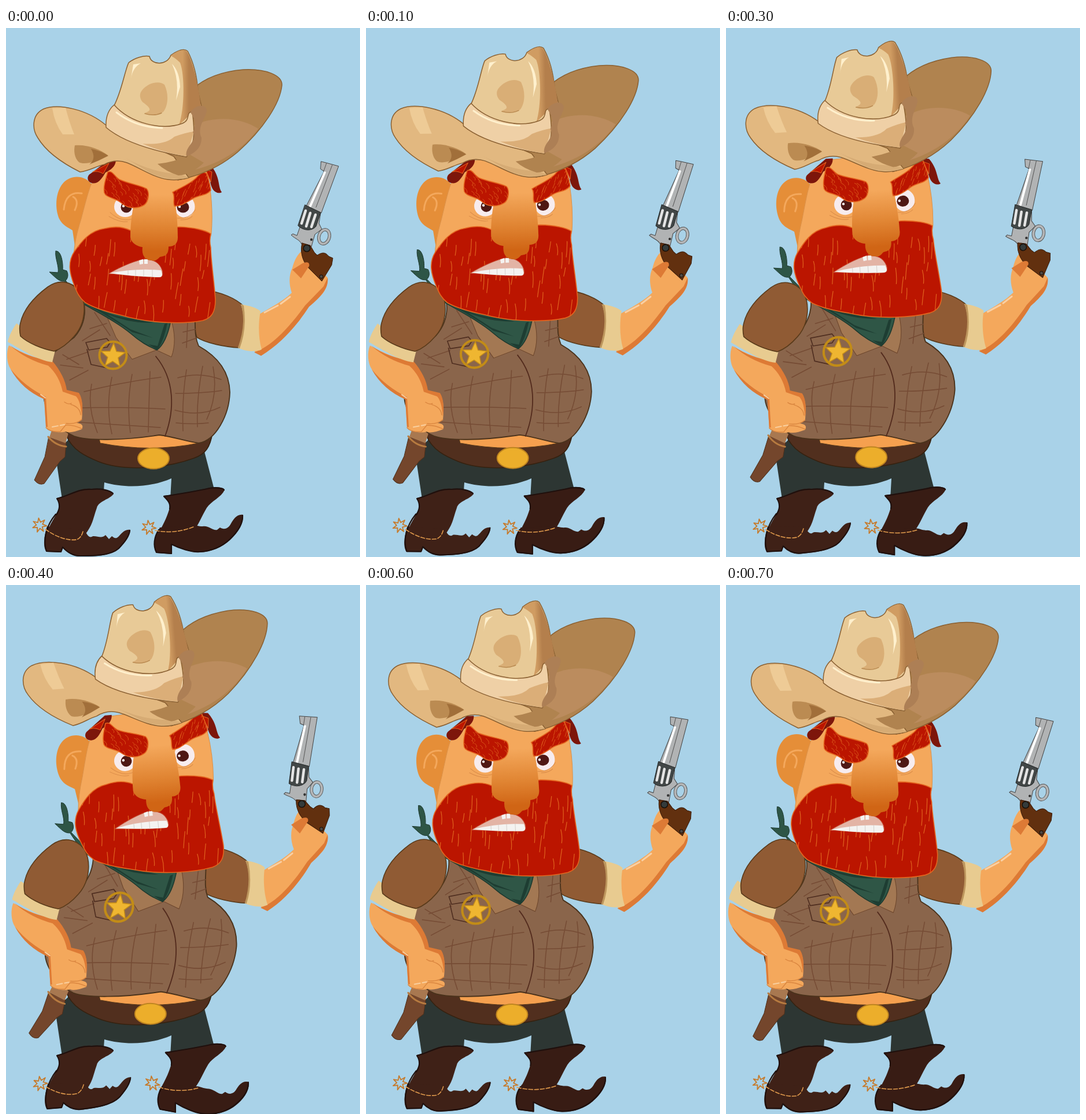
Write an HTML page that moves like this. It is 612 by 915 pixels and loops after 800 ms.

```html
<!DOCTYPE html>
<html lang="en">
<head>
<meta charset="utf-8">
<title>Angry sheriff</title>
<style>
html, body { margin: 0; width: 100%; height: 100%; overflow: hidden; background: #a9d2e8; }
svg { display: block; width: 100vw; height: 100vh; }
path { stroke-linejoin: round; stroke-linecap: round; }
.line { fill: none; }
.skin { fill: #f4a85c; }
.shade { fill: #dd7a35; }
.sleeve { fill: #905b34; stroke: #593a1a; stroke-width: 1.6; }
.cuff { fill: #e8cb90; }
.boot { fill: #3f2117; }
.boot.far { fill: #381c14; }
.edge { fill: none; stroke: #1f100d; stroke-width: 2.2; }
.chain { fill: none; stroke: #e09a4c; stroke-width: 1.6; stroke-dasharray: 7 3; }
.spur { fill: none; stroke: #c67a2b; stroke-width: 1.8; }
.plaid { fill: none; stroke: #754b34; stroke-width: 1.5; }
.hair { fill: #bb1500; stroke: #e4641f; stroke-width: 1.6; }
.strand { fill: none; stroke: #e0631f; stroke-width: 1.2; }
.strand.fine { stroke-width: .8; }
.gun { fill: #b1b3b4; stroke: #444; stroke-width: 1; }
.hat { stroke: #8a6032; stroke-width: 1.5; }
</style>
</head>
<body>
<svg viewBox="0 0 612 915" preserveAspectRatio="none">
<defs>
  <linearGradient id="noseFill" gradientUnits="userSpaceOnUse" x1="0" y1="288" x2="0" y2="386">
    <stop offset="0" stop-color="#f4a85c"/><stop offset=".55" stop-color="#e18634"/><stop offset="1" stop-color="#d06515"/>
  </linearGradient>
  <linearGradient id="sideFill" gradientUnits="userSpaceOnUse" x1="292" y1="0" x2="336" y2="0">
    <stop offset=".3" stop-color="#d09c62"/><stop offset=".55" stop-color="#b47f4c"/>
  </linearGradient>
  <clipPath id="beardClip"><use href="#beard"/></clipPath>
  <clipPath id="browClipL"><use href="#browL"/></clipPath>
  <clipPath id="browClipR"><use href="#browR"/></clipPath>
</defs>

<path fill="#2d3633" d="M85 735L97 815 168 815 170 786C205 796 250 795 286 779L284 815 361 802 341 725 108 712Z"/>

<g>
  <path class="boot" d="M88 813C110 808 125 795 148 797 165 796 180 799 186 806 180 815 160 818 157 830 150 850 150 860 136 877L120 895 70 887C67 870 82 852 87 840 95 830 92 822 88 813Z"/>
  <path class="edge" d="M87 842C95 830 92 820 88 814 110 809 125 796 148 798 165 796 180 800 185 805"/>
</g>
<g id="footL">
  <path class="boot" d="M71 862C64 885 65 900 70 906L95 907 98 898C105 906 115 914 128 914 150 914 182 914 196 900 207 889 214 879 215 868 204 866 199 876 193 881 189 884 186 881 183 879L178 884 172 877C165 884 158 878 150 879 142 885 138 870 135 868Z"/>
  <path class="edge" d="M86 841C70 860 63 885 70 905L95 906 98 898C108 909 118 913 128 913 150 913 181 913 195 900 206 888 213 879 214 869"/>
  <path class="chain" d="M68 867Q98 888 122 885 130 882 133 871"/>
  <path class="spur" data-spur="58 860"/>
</g>
<g id="shaftR">
  <path class="boot far" d="M272 809C300 806 330 800 352 795 365 793 376 795 378 799 372 812 355 818 347 830 338 845 335 855 326 868L300 893 262 876C275 855 280 840 283 830 285 820 278 815 272 809Z"/>
  <path class="edge" d="M283 832C285 820 278 816 273 810 300 806 330 801 352 796 365 794 376 796 377 799"/>
</g>
<g id="footR">
  <path class="boot far" d="M266 864C256 880 254 895 260 908L287 910 287 893C300 900 320 908 335 907 355 906 374 898 387 886 400 874 411 858 410 842 399 840 393 850 389 857 384 867 376 868 370 864L365 868C358 870 350 860 340 862 332 862 328 860 324 860Z"/>
  <path class="edge" d="M264 868C256 880 254 895 260 907L286 909 286 893C300 900 320 907 335 906 355 905 373 897 386 885 399 873 410 858 409 843"/>
  <path class="chain" d="M258 869Q290 876 324 863"/>
  <path class="spur" data-spur="247 864"/>
</g>

<path fill="#512f1e" stroke="#35210f" stroke-width="1.6" d="M104 704L124 692 338 702 357 700C353 725 345 737 325 744 270 764 200 766 160 750 138 741 114 730 104 704Z"/>
<path fill="#f5a04f" stroke="#593a1a" d="M158 695L332 700 333 718Q250 735 163 718Z"/>
<ellipse id="buckle" cx="255" cy="744.500" rx="27" ry="18" fill="#ecae2b" stroke="#be8420" stroke-width="2"/>

<g id="holster">
  <path fill="#74462c" stroke="#50301b" d="M74 708L104 717 102 742 93 750 66 788Q57 792 49 782L67 742Z"/>
  <path fill="#a87850" d="M79 696L109 697 103 718 75 708Z"/>
  <path class="line" stroke="#b77b40" stroke-width="3" d="M73 707Q85 722 104 724"/>
</g>

<g id="armR">
  <path class="sleeve" d="M340 453C372 456 398 468 412 482 417 510 410 537 403 553 380 552 345 545 330 535L320 500Z"/>
  <path class="skin" d="M436 496C455 485 480 472 494 458 488 440 490 425 495 415 499 400 504 392 512 385L556 432C557 442 552 455 545 462L520 482C500 512 475 542 442 566L430 560Z"/>
  <path class="shade" d="M429 561L441 556C470 540 495 510 517 480L549 447 556 432C558 448 548 462 524 482 502 516 475 546 441 567Z"/>
  <path class="line" stroke="#f9d0a4" stroke-width="3" d="M447 492L470 480M475 477L491 465"/>
  <path class="cuff" d="M406 478C420 480 434 484 440 490 436 510 436 535 442 556 430 562 410 558 401 553 412 530 414 500 406 478Z"/>
  <path fill="#bd965d" d="M406 478L411 480Q417 520 404 554L401 553Q416 510 406 478Z"/>
</g>

<g id="gun">
  <path class="gun" d="M545 231L553 233 575 239 545 320 519 308 550 248 544 244Z"/>
  <path class="line" stroke="#fff" stroke-width="4" d="M551 250L526 308"/>
  <path class="line" stroke="#555" d="M564 237L536 310M554 234L549 248"/>
  <ellipse cx="550" cy="361" rx="9" ry="12.500" transform="rotate(17 550 361)" fill="none" stroke="#555" stroke-width="5.500"/>
  <ellipse cx="550" cy="361" rx="9" ry="12.500" transform="rotate(17 550 361)" fill="none" stroke="#b5b6b7" stroke-width="3.700"/>
  <path class="gun" d="M536 318L544 320 541 338 546 348 534 357 528 378 511 374C508 366 500 365 493 358L496 356 503 359 509 342Z"/>
  <path fill="#424747" stroke="#252929" d="M517 306L544 319 536 343C530 351 515 352 505 342Z"/>
  <path class="line" stroke="#e4e4e4" stroke-width="4.500" d="M518 316L511 338M526 320L519 343M535 323L528 344"/>
  <circle cx="528" cy="366" r="2.200" fill="#333"/>
  <path fill="#62300f" stroke="#3a1b09" d="M512 372L526 376 533 388 538 393C545 389 551 386 558 395L565 398 563 410 546 438 522 414C512 402 508 386 512 372Z"/>
  <circle cx="520" cy="381" r="5.800" fill="#343b3b" stroke="#17100a" stroke-width="1.500"/>
  <circle cx="545" cy="430" r="3" fill="#514943" stroke="#17100a"/>
</g>
<path class="shade" id="thumb" d="M495 418L511 408C518 404 526 404 524 412L510 433Z"/>

<g id="torso">
  <path fill="#8a654b" stroke="#4a321b" stroke-width="1.8" d="M128 455C140 480 140 510 118 535L79 564C75 585 70 620 66 642 68 665 95 697 118 706 140 714 200 714 265 704 290 707 315 716 333 718 362 714 386 670 387 630 386 590 360 565 333 550 325 532 328 515 326 490L250 460Z"/>
  <path class="line" stroke="#532b1d" stroke-width="1.8" d="M259 568C292 608 292 660 275 706"/>
  <path class="plaid" d="M135 629Q205 612 268 604M132 657Q200 655 275 659M127 682Q190 686 267 691M148 616Q140 655 158 700M183 604Q172 655 183 702M218 599Q208 650 215 700M249 594Q247 650 246 699M297 605Q335 594 372 608M293 632Q340 632 373 627M292 661Q335 673 370 656M294 683Q325 686 350 683M312 591Q304 640 306 697M340 585Q329 640 331 690M358 586Q367 635 347 677"/>
  <path class="plaid" d="M145 520L174 511M132 541L162 522M153 492L180 532M306 526L328 521M305 545L330 536M314 508L312 553M98 565L126 582M94 583L133 588M110 609L142 592M105 573L143 560"/>
  <path class="line" stroke="#4f2e20" stroke-width="1.600" d="M138 544L174 537 180 544 175 552 143 557ZM140 556L147 582 175 588"/>
  <path fill="#a37853" stroke="#6c452b" d="M174 498L190 535 218 573 260 557 286 569C293 550 293 528 285 503Z"/>
  <circle cx="185" cy="566" r="23.500" fill="none" stroke="#c28c17" stroke-width="4"/>
  <path id="star" fill="#efb631" stroke="#c58d19" stroke-width="1.500"/>
</g>

<g id="scarf">
  <path fill="#2e5546" stroke="#1d382e" d="M86 386C95 384 99 405 98 418L105 420C109 428 106 434 103 437L135 470 120 466 101 438C92 439 87 433 75 422L90 423C92 412 84 397 86 386Z"/>
  <path fill="#2f5646" stroke="#1d382e" stroke-width="1.5" d="M120 455L286 500C281 530 273 548 261 557 245 550 232 543 215 528 190 507 155 490 132 476Z"/>
  <path fill="#1e3d32" d="M137 473Q175 499 225 504L254 510Q213 511 175 495L215 521 254 536 218 526Q178 499 137 477ZM262 550L274 512 279 510Q274 538 262 557L246 547Z"/>
</g>

<g id="armL">
  <path class="skin" d="M5 549C0 560 1 580 8 590 20 612 45 632 66 642L69 690C75 699 95 701 103 698 110 701 120 698 131 694 135 687 130 684 122 683L131 678C133 660 133 645 126 632L104 627C102 612 93 593 80 577 45 570 25 560 5 549Z"/>
  <path class="shade" d="M7 549Q35 570 80 576C94 592 103 610 105 626L126 631C133 642 133 658 131 672Q129 645 121 637L98 629Q92 601 73 584 35 574 7 549ZM8 590Q32 620 69 638L72 690 69 690 66 642Q27 625 8 590Z"/>
  <path class="line" stroke="#d9853f" stroke-width="1.4" d="M69 691Q75 699 94 698L103 687Q116 686 131 693M104 684Q121 686 131 677M101 647Q108 652 113 649M112 651Q128 656 129 669"/>
  <path class="line" stroke="#f9cf9f" stroke-width="2" stroke-dasharray="10 4" d="M60 634L70 641M80 690L101 686"/>
  <path class="cuff" d="M18 511C12 520 5 532 3 543 25 555 55 575 80 578L85 558 24 515Z"/>
  <path class="sleeve" d="M24 515C28 490 45 468 72 448 90 435 112 436 128 456 140 478 137 512 118 533 105 548 92 556 83 559 62 555 38 545 25 533Q23 523 24 515Z"/>
</g>

<g id="head">
  <path fill="#e58e38" d="M151 275C140 254 113 252 99 268 84 285 85 315 92 330 98 342 108 345 115 350L119 377 140 320Z"/>
  <path class="line" stroke="#f4a85c" stroke-width="3" d="M100 314C102 292 113 283 131 286M116 292Q127 298 119 315"/>
  <path class="skin" stroke="#db9149" d="M152 262C145 270 138 300 130 330 122 355 118 375 117 395L130 420 340 420 355 355C358 320 355 280 347 245L300 225 190 230Z"/>
  <path fill="#7d160b" d="M178 228L146 252C139 256 140 266 148 268 158 271 165 262 172 250 180 246 190 240 190 228ZM340 238C355 250 350 265 357 278 361 285 369 287 373 284 366 275 371 260 356 240Z"/>
  <path fill="#bb1500" stroke="#e4641f" d="M150 249L178 234 168 252Q158 246 150 249ZM345 244L356 249 354 266Z"/>
  <g fill="#f7ecee">
    <ellipse cx="206" cy="309" rx="19" ry="18"/><ellipse cx="309" cy="309" rx="17.500" ry="19"/>
  </g>
  <g fill="#4f1814"><circle cx="208" cy="310" r="9.500"/><ellipse cx="306" cy="310" rx="10.500" ry="9.500"/></g>
  <g fill="#fff"><circle cx="203" cy="308" r="2.200"/><circle cx="300" cy="309" r="2.200"/></g>
  <path class="line" stroke="#d98b48" d="M180 319Q200 338 222 329M178 326Q197 337 210 335M296 329Q317 331 327 315M302 332Q316 332 322 326"/>
  <path id="beard" class="hair" d="M118 387C130 370 145 350 170 347 190 342 205 345 215 350L300 344C325 345 345 350 354 356 352 365 352 372 354 380 354 400 360 440 362 470 362 492 355 502 340 506 310 512 250 512 200 497 170 490 150 483 137 475 125 465 122 455 118 445 110 425 106 405 118 387Z"/>
  <path id="beardHair" class="strand" clip-path="url(#beardClip)"/>
  <path fill="#e3b4a5" stroke="#c5442a" d="M177 425C195 415 215 405 237 400 255 400 265 405 270 419 272 427 270 431 265 431 240 431 210 427 177 425Z"/>
  <path fill="#f4f3f1" d="M180 424Q225 415 268 419L270 426Q270 431 265 431 220 430 180 424ZM230 402L237 400 237 408 231 409ZM239 400L245 400 245 408 239 408Z"/>
  <path class="line" stroke="#cfc8c3" stroke-width=".8" d="M211 419V427M224 418V429M238 418V430M253 418V430"/>
  <path fill="url(#noseFill)" d="M225 288C219 310 215 335 215 362 217 373 228 378 236 379 234 395 242 402 252 402 258 404 262 400 266 396 272 394 281 396 281 378 290 378 297 374 297 362 297 345 296 325 291 288Z"/>
  <g id="browGroupL">
    <path id="browL" class="hair" d="M176 249C185 246 187 257 196 262 211 269 232 272 243 278 249 285 246 301 239 306 228 313 212 313 201 304 191 294 173 294 170 285 168 274 172 262 176 249Z"/>
    <path id="browHairL" class="strand fine" clip-path="url(#browClipL)"/>
  </g>
  <g id="browGroupR">
    <path id="browR" class="hair" d="M288 284C300 277 318 270 328 260 335 252 342 247 347 252 350 262 353 270 354 281 345 291 335 288 323 295 311 302 301 309 291 308 288 300 293 292 288 284Z"/>
    <path id="browHairR" class="strand fine" clip-path="url(#browClipR)"/>
  </g>
</g>

<g id="hat">
  <path class="hat" fill="#b0834f" d="M322 106C345 85 375 75 410 72 450 70 478 82 477 99 474 130 445 175 400 215 370 240 335 256 297 263L250 230Z"/>
  <path fill="#bb8c5e" d="M325 168C365 150 408 156 436 174 412 207 368 241 300 250Z"/>
  <path class="hat" fill="#e2b880" d="M174 169C140 140 90 130 65 140 44 150 45 175 55 190 70 215 100 235 128 249 145 247 155 239 170 236Q189 226 209 233C230 241 255 259 280 262 293 264 305 262 316 259L290 222Z"/>
  <path fill="#d6ab74" d="M205 224Q250 250 302 253L316 259Q282 266 250 251Z"/>
  <path fill="#b0834f" d="M262 235Q292 232 318 219L342 233Q320 254 298 255 276 248 262 235Z"/>
  <path fill="#bb8b52" d="M119 203C140 201 163 210 176 220 160 230 136 238 126 232 118 225 117 212 119 203Z"/>
  <path fill="#a16f3a" d="M147 209Q163 212 177 221 160 230 144 236 157 226 147 209Z"/>
  <path fill="#eecb96" d="M80 139L103 138Q110 165 118 184L98 184Q84 165 80 139Z"/>
  <path class="hat" fill="#e8ca97" d="M186 136C200 110 205 75 212 60 222 52 238 47 248 49 251 65 279 65 285 47 295 40 307 34 314 40 322 55 330 80 332 110L339 140 310 172C270 178 215 165 186 136Z"/>
  <path fill="url(#sideFill)" d="M285 48C295 40 307 35 313 41 324 60 333 100 337 136L318 150 299 168C309 140 309 80 301 60Q293 52 285 48Z"/>
  <path fill="#d9ae76" d="M235 108C245 95 265 90 274 98 282 115 280 135 272 145 262 152 245 151 240 147 253 143 250 138 236 128 230 120 231 113 235 108Z"/>
  <path class="line" stroke="#b98a51" stroke-width="1.500" d="M240 148Q256 153 269 147"/>
  <path fill="#fff0cd" d="M287 62Q300 75 301 102L294 125Q300 90 287 62ZM220 63L233 61Q219 68 216 88Z"/>
  <path class="hat" fill="#efd0a6" d="M187 133C176 142 172 155 173 172 200 195 250 212 312 223 326 205 327 180 322 145 310 145 320 159 305 165 270 178 215 165 187 133Z"/>
  <path fill="#dbae78" d="M236 200Q275 203 291 188 310 181 325 179L312 222Q270 215 236 200Z"/>
  <path fill="#ad7f55" d="M319 146C324 135 345 129 347 142 347 155 329 170 338 190 338 205 330 215 312 222 308 205 332 196 323 180Q332 165 319 146Z"/>
  <path class="line" stroke="#fff0cd" stroke-width="3" d="M191 146Q225 172 270 173"/>
</g>
</svg>
<script>
const el = id => document.getElementById(id);

// Small seeded generator keeps the hair identical on every load.
function seeded(s) {
  return () => (s = (s * 16807) % 2147483647) / 2147483647;
}

function starPath(cx, cy, tips, outer, inner, turn) {
  let d = "";
  for (let i = 0; i < tips * 2; i++) {
    const r = i % 2 ? inner : outer, a = turn + Math.PI * i / tips;
    d += (i ? "L" : "M") + (cx + r * Math.cos(a)).toFixed(1) + " " + (cy + r * Math.sin(a)).toFixed(1);
  }
  return d + "Z";
}

// Jittered grid of short wavy strands over a box.
function strands(box, stepX, stepY, length, lean, seed) {
  const rnd = seeded(seed), [x0, y0, x1, y1] = box;
  let d = "";
  for (let y = y0; y < y1; y += stepY)
    for (let x = x0; x < x1; x += stepX) {
      const l = length * (0.6 + 0.6 * rnd()), dx = lean * l + (rnd() - 0.5) * l * 0.3;
      const px = x + (rnd() - 0.5) * stepX, py = y + (rnd() - 0.5) * stepY;
      d += `M${px} ${py}q${dx + 2} ${l / 2} ${dx} ${l}`;
    }
  return d;
}

el("star").setAttribute("d", starPath(185, 567, 5, 22, 9.5, -1.52));
for (const p of document.querySelectorAll("[data-spur]")) {
  const [x, y] = p.dataset.spur.split(" ").map(Number);
  p.setAttribute("d", starPath(x, y, 7, 12.5, 5.5, 0.1));
}
el("beardHair").setAttribute("d", strands([125, 362, 360, 500], 17, 36, 24, -0.08, 71));
el("browHairL").setAttribute("d", strands([174, 256, 245, 310], 9, 10, 9, 0.5, 19));
el("browHairR").setAttribute("d", strands([290, 254, 354, 308], 9, 10, 9, -0.4, 43));

const turn = (deg, x, y) => u => `rotate(${deg * u} ${x} ${y})`;
const shift = (x, y) => u => `translate(${x * u} ${y * u})`;
// Identity plus u times the given matrix changes.
const warp = (a, b, c, d, e, f) => u =>
  `matrix(${1 + a * u} ${b * u} ${c * u} ${1 + d * u} ${e * u} ${f * u})`;

const motion = {
  hat: turn(-1.13, 48, 401),
  head: turn(-1.3, 150, 307),
  browGroupL: shift(0.5, -1.8),
  browGroupR: shift(-0.4, -2.8),
  scarf: shift(2.4, -2.3),
  torso: warp(0.007, 0, -0.018, 0.015, 11.5, -10.7),
  armL: shift(1.9, 0.3),
  armR: warp(-0.01, 0, 0.0117, -0.005, 0.5, 2.1),
  gun: turn(-2.77, 504, 424),
  thumb: shift(-0.5, -0.8),
  holster: turn(1.8, 100, 705),
  buckle: shift(-1.3, -0.7),
  footL: warp(0, -0.03, 0, 0, 0.3, 2.3),
  shaftR: shift(0.7, -0.3),
  footR: warp(0.006, 0.03, 0, 0, 0, -7.9)
};

const STEP = 100, STEPS = 8;
function draw(time) {
  const k = Math.floor(time / STEP) % STEPS;
  const u = STEPS / 2 - Math.abs(STEPS / 2 - k);
  for (const id in motion) el(id).setAttribute("transform", motion[id](u));
}

const start = performance.now();
function tick() {
  draw(performance.now() - start);
  requestAnimationFrame(tick);
}
tick();
</script>
</body>
</html>
```
